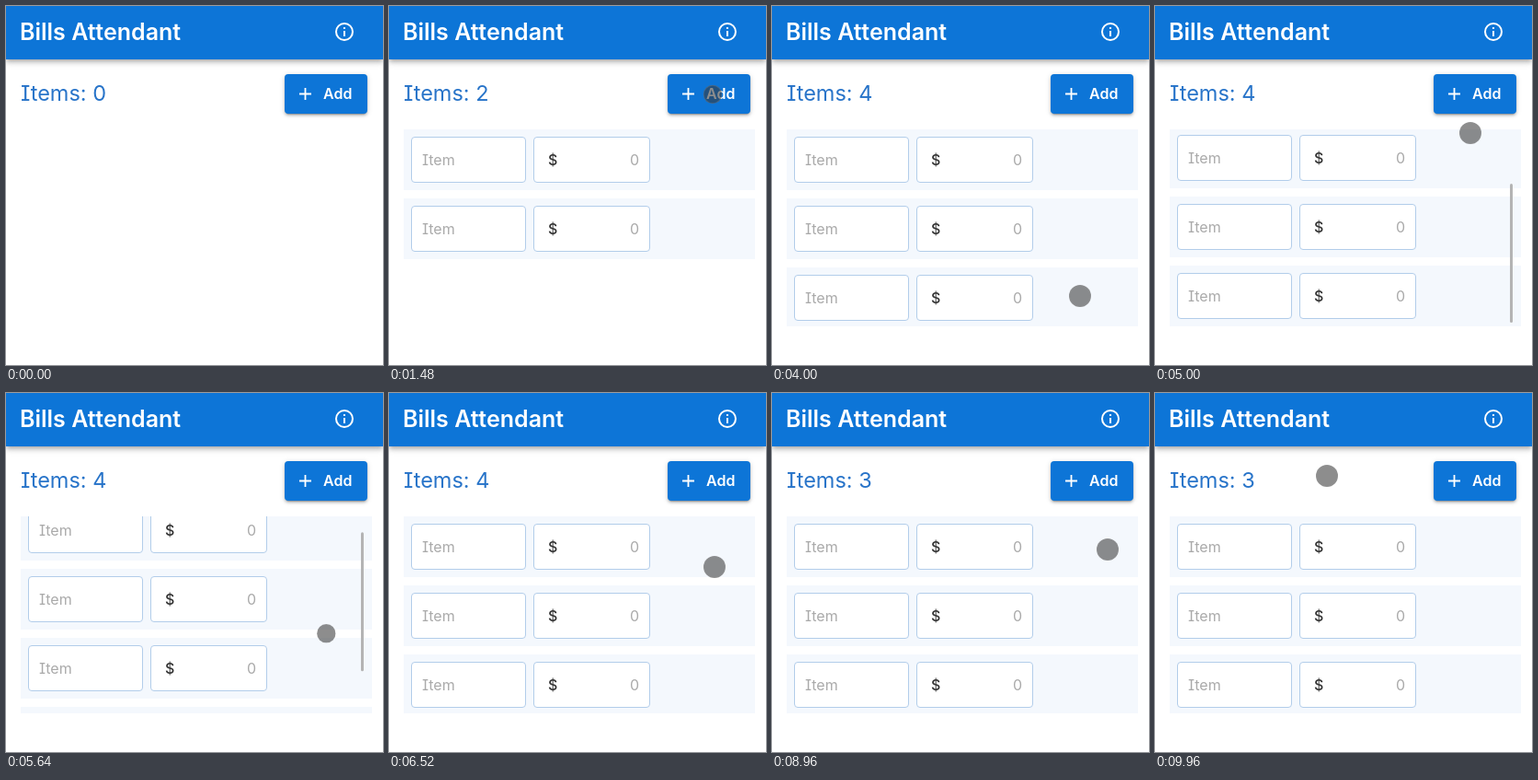
Recreate the animation shown at these times as an HTML page. Size 410 by 390 pixels, loop 10000 ms.

```html
<!DOCTYPE html>
<html lang="en">
<head>
<meta charset="utf-8">
<style>
  html, body { margin: 0; width: 100%; height: 100%; overflow: hidden; background: #fff; }
  body { position: relative; font: 16px Inter, sans-serif; font-feature-settings: "cv08"; }
  body * { position: absolute; box-sizing: border-box; white-space: nowrap; }
  header { left: 0; top: 0; width: 410px; height: 58px; background: #0d75d7; color: #fff;
    box-shadow: 0 2px 4px -1px #0003, 0 4px 5px #0002, 0 1px 10px #0002; }
  h1 { margin: 0; left: 15px; top: 0; font-size: 25px; font-weight: 600; line-height: 56px; }
  #count { left: 16px; top: 75px; font-size: 23.5px; line-height: 40px; color: #2874c9; }
  #add { left: 303px; top: 74px; width: 90px; height: 43px; border-radius: 4px; background: #0d75d7; color: #fff;
    box-shadow: 0 3px 1px -2px #0003, 0 2px 3px #0003, 0 1px 6px #0002; }
  #add span { left: 42px; font-weight: 600; line-height: 42px; }
  #list { left: 16px; top: 134px; width: 382px; height: 214px; overflow: hidden; }
  .row { left: 0; width: 382px; height: 66px; overflow: hidden; }
  .face { inset: 0; background: #f4f8fd; }
  .box { top: 8px; height: 50px; border: 1px solid #b2cdea; border-radius: 4px; background: #fff;
    line-height: 49px; color: #aaa; }
  .item { left: 8px; width: 125px; padding-left: 11px; }
  .price { left: 141px; width: 127px; padding-right: 11px; text-align: right; }
  .price b { left: 15px; font-weight: 500; color: #333; }
  .trash { left: 340px; top: 24px; }
  #thumb { left: 386px; top: 138px; width: 3px; height: 151px; border-radius: 2px; background: #b4b4b4; }
  #cursor { left: -12px; top: -12px; width: 24px; height: 24px; border-radius: 50%;
    background: rgba(55, 55, 55, .57); border: 1.5px solid rgba(150, 150, 150, .3); }
</style>
</head>
<body>
<header>
  <h1>Bills Attendant</h1>
  <svg style="left:356px;top:16px" width="24" height="24" fill="none" stroke="#fff" stroke-width="2">
    <circle cx="12" cy="12" r="9"/><path d="M12 7v2M12 11v6"/>
  </svg>
</header>
<div id="count"></div>
<div id="add">
  <svg style="left:16px;top:15px" width="13" height="13" stroke="#fff" stroke-width="1.8"><path d="M6.5 0v13M0 6.5h13"/></svg>
  <span>Add</span>
</div>
<div id="list"></div>
<div id="thumb"></div>
<div id="cursor"></div>
<script>
const $ = id => document.getElementById(id);
const LOOP = 10000, MOVE = 500, ROWS = 4, PITCH = 75, SCROLL = 77, SWIPE = 67;
const FIRST_ADD = 940, ADD_EVERY = 380, LAST_ADD = FIRST_ADD + (ROWS - 1) * ADD_EVERY;
const SCROLLED = 4700, RETURNED = 5800, SWIPED = 7300, DELETED = 8120;

// Where the pointer arrives, and when
const stops = [
  { at: 840, x: 352, y: 96 },
  { at: 2600, x: 146, y: 87 },
  { at: 3600, x: 335, y: 315 },
  { at: SCROLLED, x: 343, y: 138, drag: true },
  { at: RETURNED, x: 350, y: 300, drag: true },
  { at: 6500, x: 354, y: 189 },
  { at: SWIPED, x: 285, y: 175, drag: true },
  { at: 7900, x: 365, y: 170 },
  { at: LOOP - 40, x: 187, y: 90 }
];

const rows = Array.from({ length: ROWS }, () => {
  const row = document.createElement('div');
  row.className = 'row';
  row.innerHTML = `
    <svg class="trash" width="24" height="24" fill="#444"><path d="M6 19a2 2 0 0 0 2 2h8a2 2 0 0 0 2-2V7H6zM19 4h-3.5l-1-1h-5l-1 1H5v2h14z"/></svg>
    <div class="face">
      <div class="box item">Item</div>
      <div class="box price"><b>$</b>0</div>
    </div>`;
  $('list').append(row);
  return row;
});

// Smooth step from 0 to 1 that finishes at `end`
function ease(t, end, length = MOVE) {
  const u = Math.min(1, Math.max(0, (t - end) / length + 1));
  return u * u * (3 - 2 * u);
}
const during = (t, from, to) => t >= from && t < to;
const flash = (t, from, to) => ease(t, from + 100, 100) - ease(t, to + 250, 250);

function drawList(t) {
  const scroll = ease(t, SCROLLED) - ease(t, RETURNED);
  const collapse = ease(t, DELETED + 320, 320);
  const added = Math.min(ROWS, Math.max(0, Math.floor((t - FIRST_ADD) / ADD_EVERY) + 1));

  $('count').textContent = 'Items: ' + (added - (t >= DELETED));
  rows.forEach((row, i) => {
    row.hidden = i >= added;
    row.style.top = i * PITCH - scroll * SCROLL - (i && collapse * PITCH) + 'px';
  });
  rows[0].style.height = 66 * (1 - collapse) + 'px';
  rows[0].querySelector('.face').style.transform = `translateX(${-SWIPE * ease(t, SWIPED)}px)`;

  $('thumb').style.opacity = flash(t, LAST_ADD, 2900) + flash(t, SCROLLED - MOVE, 6000);
  $('thumb').style.transform = `translateY(${scroll * 55}px)`;
}

function drawCursor(t) {
  let x = 300, y = 405;
  for (const stop of stops) {
    const e = ease(t, stop.at);
    x += (stop.x - x) * e;
    y += (stop.y - y) * e;
  }
  const adding = during(t, FIRST_ADD, LAST_ADD + ADD_EVERY / 2) && (t - FIRST_ADD) % ADD_EVERY < ADD_EVERY / 2;
  const dragging = stops.some(s => s.drag && during(t, s.at - MOVE, s.at));
  const pressed = adding || dragging || during(t, DELETED - 60, DELETED + 80);
  $('cursor').style.transform = `translate(${x}px, ${y}px) scale(${pressed ? .85 : 1})`;
}

function tick() {
  const t = performance.now() % LOOP;
  drawList(t);
  drawCursor(t);
  requestAnimationFrame(tick);
}
tick();
</script>
</body>
</html>
```
